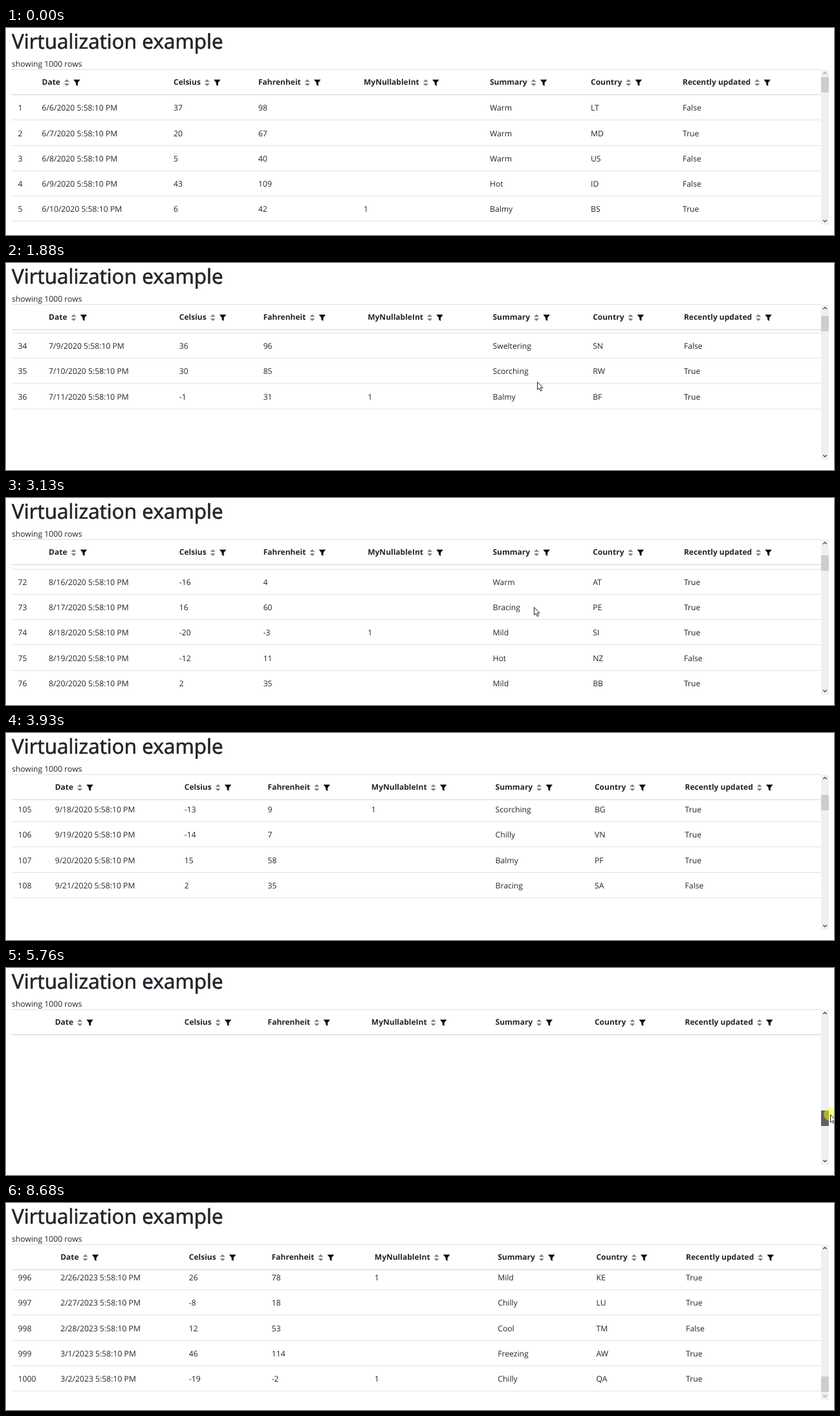
Recreate the animation shown at these times as an HTML page. Size 1280x321 px, loop 8.92 s.

```html
<!DOCTYPE html>
<html lang="en">
<head>
<meta charset="utf-8">
<title>Virtualization example</title>
<style>
  html, body { margin: 0; width: 100%; height: 100%; overflow: hidden; background: #fff; }
  svg { display: block; width: 100%; height: 100%; }
  text {
    font: 12.2px "Open Sans", "Noto Sans", sans-serif; fill: #212529;
    white-space: pre; text-rendering: geometricPrecision;
  }
  .title { font-size: 31.5px; stroke: #212529; stroke-width: .7; }
  .head { font-size: 12px; font-weight: 700; }
  .line { fill: #dee2e6; }
  .chevron { fill: none; stroke-width: 1.5; }
</style>
</head>
<body>
<svg viewBox="0 0 1280 321">
  <defs>
    <clipPath id="body"><rect x="9" y="104" width="1251" height="201"/></clipPath>
    <g id="icons">
      <path fill="#808080" d="M-4 83.5L0 79.5L4 83.5ZM-4 86L0 90L4 86Z"/>
      <path fill="#111" d="M10.3 80H20.7L17 85V90L14 88V85Z"/>
    </g>
  </defs>
  <text class="title" x="9" y="32">Virtualization example</text>
  <text x="9" y="59.5">showing 1000 rows</text>
  <g id="rows" clip-path="url(#body)"></g>
  <rect class="line" x="9" y="64" width="1251" height="1"/>
  <rect class="line" x="9" y="102.5" width="1251" height="1.7"/>
  <g id="header"></g>
  <rect x="1260" y="65" width="12" height="240" fill="#f0f0f0"/>
  <rect id="thumb" x="1260" width="12" height="24"/>
  <path id="up" class="chevron" d="M1263.2 71.5L1266 68.7L1268.8 71.5"/>
  <path id="down" class="chevron" d="M1263.2 297.7L1266 300.5L1268.8 297.7"/>
  <circle id="press" r="10" fill="#ff0" fill-opacity=".5"/>
  <path id="cursor" fill="#fff" stroke="#222" stroke-linejoin="round"
    d="M.5 .5V12.6L3.3 10L5.3 14.6L7.2 13.8L5.2 9.3H9Z"/>
</svg>
<script>
const LOOP = 8920, STEP = 78.125;
const PITCH = 39.3, MAX_SCROLL = 39111.5, POOL = 14, RIGHT = 1260;
const RENDER_EVERY = 4, RENDER_LAG = 140, ROWS_AHEAD = 9.95;
const $ = id => document.getElementById(id);

const columns = { Date: 55.5, Celsius: 259, Fahrenheit: 390, MyNullableInt: 553,
  Summary: 748, Country: 904, 'Recently updated': 1046 };

// First row number of each block; cells: celsius summary country updated [nullable]
const blocks = {
  1: '37 Warm LT False,20 Warm MD True,5 Warm US False,43 Hot ID False,6 Balmy BS True 1',
  34: '36 Sweltering SN False,30 Scorching RW True,-1 Balmy BF True 1',
  72: '-16 Warm AT True,16 Bracing PE True,-20 Mild SI True 1,-12 Hot NZ False,2 Mild BB True',
  105: '-13 Scorching BG True 1,-14 Chilly VN True,15 Balmy PF True,2 Bracing SA False',
  991: '0 Chilly GS True,-19 Sweltering ZW True,11 Bracing KH True 1,-8 Chilly CG True,' +
    '12 Mild NE True,26 Mild KE True 1,-8 Chilly LU True,12 Cool TM False,' +
    '46 Freezing AW True,-19 Chilly QA True 1'
};
const knownRows = {};
for (const first in blocks)
  blocks[first].split(',').forEach((row, i) => knownRows[+first + i] = row.split(' '));
const samples = Object.values(knownRows);

// Other rows mix cells of the known ones
function mixedRow(n) {
  const pick = i => {
    const random = Math.abs(Math.sin(n * 12.9898 + i * 78.233) * 43758.5453) % 1;
    return samples[Math.floor(random * samples.length)][i];
  };
  return [0, 1, 2, 3, 4].map(pick);
}

function rowCells(n) {
  const [celsius, summary, country, updated, nullable = ''] = knownRows[n] || mixedRow(n);
  const day = new Date(Date.UTC(2020, 5, 5 + n));
  const date = `${day.getUTCMonth() + 1}/${day.getUTCDate()}/${day.getUTCFullYear()} 5:58:10 PM`;
  return [n, date, celsius, 32 + Math.trunc(celsius / 0.5556), nullable, summary, country, updated];
}

// Key points: time, value(s)
const scrollKeys = [[530, 0], [1500, 960], [1875, 1292], [2500, 2020], [2800, 2600], [3125, 2783.7],
  [3906, 4092], [4490, 5070], [5120, 5070], [5703, 29430], [6240, 38380], [6900, 38720],
  [7187, 38892], [7380, MAX_SCROLL]];
const cursorKeys = [[78, 917, 231], [156, 849, 206], [1875, 821, 184], [3125, 816, 169],
  [4570, 1215, 306], [5040, 1274, 107], [6320, 1274, 271], [7187, 961, 257], [7430, 955, 258],
  [8360, 955, 258], [8600, 1254, 306]];
const cursorShown = [[70, 300], [610, 3600], [4570, 7650], [7730, 8660]];

function tween(keys, t) {
  const next = keys.findIndex(key => key[0] > t);
  if (next < 0) return keys[keys.length - 1].slice(1);
  if (next === 0) return keys[0].slice(1);
  const a = keys[next - 1], b = keys[next], k = (t - a[0]) / (b[0] - a[0]);
  return a.slice(1).map((value, i) => value + (b[i + 1] - value) * k);
}
const scrollAt = t => tween(scrollKeys, t)[0];

// Rows are re-rendered at intervals, for a scroll position already past
function lastRowAt(t) {
  const interval = STEP * RENDER_EVERY, offset = interval / 2;
  const rendered = Math.floor((t - offset) / interval) * interval + offset;
  return Math.min(1000, Math.floor(scrollAt(rendered - RENDER_LAG) / PITCH + ROWS_AHEAD));
}

// Wider row numbers push the columns towards the right edge
function layout(last) {
  const extra = String(last).length - 1;
  const growth = .0238 * extra * (.389 - .0185 * extra);
  return Object.values(columns).map(x => x + (RIGHT - x) * growth);
}

function add(parent, tag, attributes) {
  const node = document.createElementNS('http://www.w3.org/2000/svg', tag);
  for (const name in attributes) node.setAttribute(name, attributes[name]);
  return parent.appendChild(node);
}
const move = (node, x, y) => node.setAttribute('transform', `translate(${x} ${y})`);
const show = (node, visible) => node.setAttribute('visibility', visible ? 'visible' : 'hidden');

const headers = Object.keys(columns).map(label => {
  const group = add($('header'), 'g');
  const text = add(group, 'text', { class: 'head', y: 88.3 });
  text.textContent = label;
  add(group, 'use', { href: '#icons', x: text.getComputedTextLength() + 10 });
  return group;
});
const pool = Array.from({ length: POOL }, () => {
  const group = add($('rows'), 'g');
  add(group, 'rect', { class: 'line', x: 9, y: 14, width: 1251, height: 1 });
  const cells = Array.from({ length: 8 }, () => add(group, 'text', { x: 18.5 }));
  return { group, cells };
});

function draw(t) {
  const scroll = scrollAt(t);
  const last = lastRowAt(t);
  const starts = layout(last);
  headers.forEach((group, i) => move(group, starts[i], 0));

  pool.forEach(({ group, cells }, i) => {
    const n = last - i;
    const y = Math.round(128.2 + (n - 1) * PITCH - scroll);
    const visible = n > 0 && y > 80 && y < 330;
    show(group, visible);
    if (!visible) return;
    move(group, 0, y);
    rowCells(n).forEach((value, c) => {
      cells[c].textContent = value;
      if (c) cells[c].setAttribute('x', starts[c - 1]);
    });
  });

  const thumbTop = 76 + Math.floor(193 * scroll / MAX_SCROLL);
  const dragging = t >= 5120 && t < 6320;
  const arrowColor = enabled => enabled ? '#505050' : '#a8a8a8';
  $('thumb').setAttribute('y', thumbTop);
  $('thumb').setAttribute('fill', dragging ? '#606060' : '#cdcdcd');
  $('up').setAttribute('stroke', arrowColor(scroll > 0));
  $('down').setAttribute('stroke', arrowColor(scroll < MAX_SCROLL));

  let [x, y] = tween(cursorKeys, t);
  if (dragging) y = thumbTop + 6;
  move($('cursor'), Math.round(x), Math.round(y));
  move($('press'), Math.round(x), Math.round(y));
  show($('cursor'), cursorShown.some(([from, to]) => t >= from && t < to));
  show($('press'), dragging);
}

const start = performance.now();
let drawn = -1;
function loop() {
  const tick = Math.floor((performance.now() - start) % LOOP / STEP);
  if (tick !== drawn) draw((drawn = tick) * STEP);
  requestAnimationFrame(loop);
}
loop();
</script>
</body>
</html>
```
